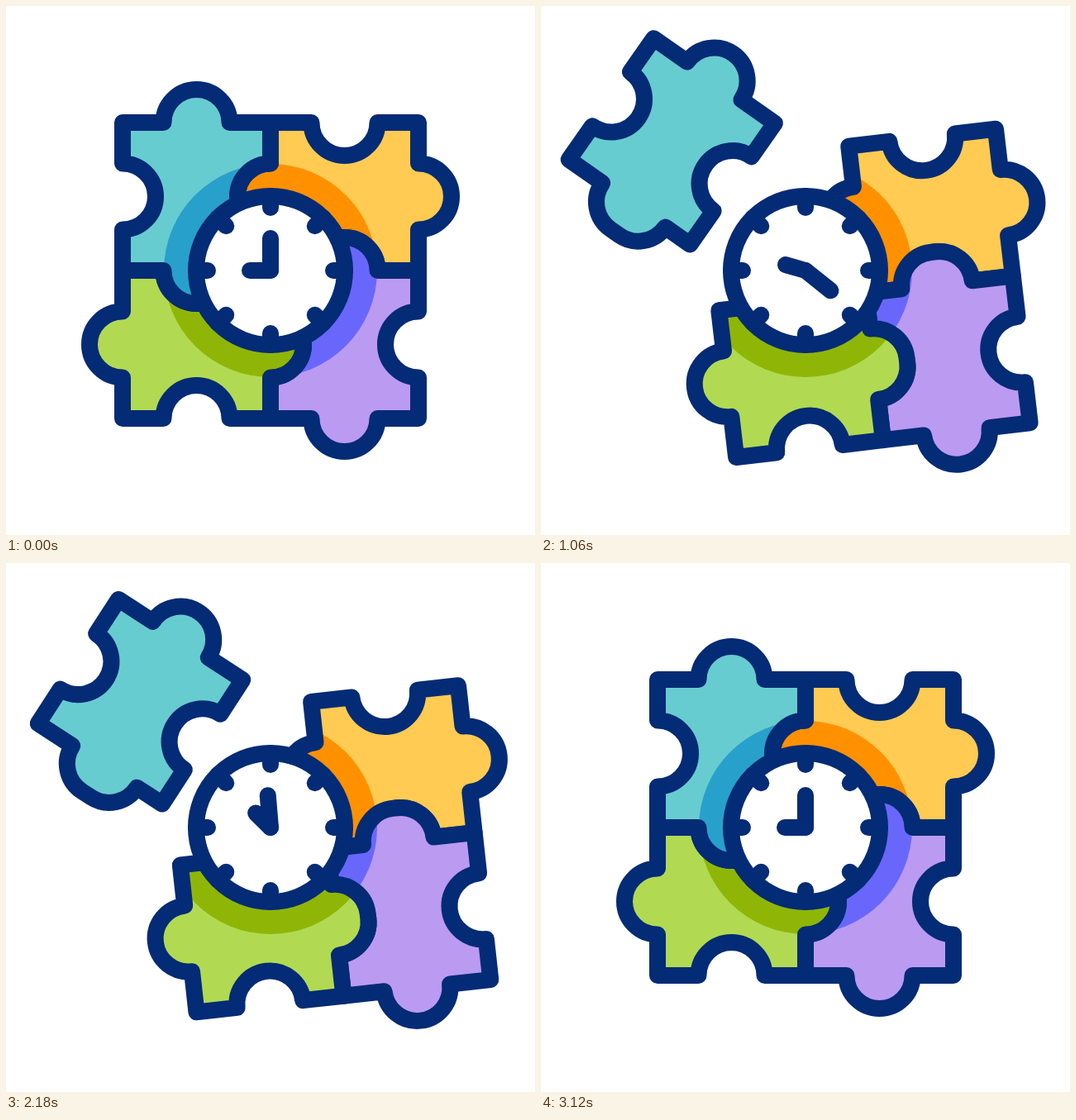
These frames come from a looping animation (640x640 px, 3.6 s). An HTML page with a canvas:

```html
<!DOCTYPE html>
<html lang="en">
<head>
<meta charset="utf-8">
<title>Puzzle clock</title>
<style>
html, body { margin: 0; width: 100%; height: 100%; overflow: hidden; background: #fff; }
canvas { display: block; width: 640px; height: 640px; }
</style>
</head>
<body>
<canvas id="stage" width="640" height="640"></canvas>
<script>
const ctx = document.getElementById('stage').getContext('2d');
const LOOP = 3600, C = 320, SIDE = 179, MID = SIDE / 2, R = 40;
const NAVY = '#042b75';
const rad = d => d * Math.PI / 180;
const clamp = x => Math.min(1, Math.max(0, x));
const sine = x => (1 - Math.cos(Math.PI * clamp(x))) / 2;

// Bezier easing with horizontal ends: (x1, 0, x2, 1)
function ease(x, x1, x2) {
  x = clamp(x);
  let lo = 0, hi = 1;
  for (let i = 0; i < 30; i++) {
    const u = (lo + hi) / 2, v = 1 - u;
    if (3 * v * v * u * x1 + 3 * v * u * u * x2 + u * u * u < x) lo = u; else hi = u;
  }
  return lo * lo * (3 - 2 * lo);
}

// Piece in the upper left quadrant; the others are quarter turns of it.
function piecePath(stretch) {
  const p = new Path2D(), q = Math.PI / 2;
  p.moveTo(-SIDE, -SIDE);
  p.arc(-MID, -SIDE, R, 2 * q, 4 * q);
  p.lineTo(0, -SIDE);
  p.arc(0, -MID, R, -q, q, true);
  p.lineTo(0, 0);
  p.arc(-MID + stretch, 0, R, 0, q);
  p.arc(-MID, 0, R, q, 2 * q);
  p.lineTo(-SIDE, 0);
  p.arc(-SIDE, -MID, R, q, -q, true);
  p.closePath();
  return p;
}

const pieces = [
  { turn: 1, fill: '#ffcb52', shade: '#ff9100', path: piecePath(6) },
  { turn: 2, fill: '#bb9af2', shade: '#6967fb', path: piecePath(6) },
  { turn: 3, fill: '#b1da52', shade: '#8fb607', path: piecePath(6) },
  { turn: 0, fill: '#67ccd0', shade: '#28a0cc', path: piecePath(13) }
];

function disc(r) {
  ctx.beginPath();
  ctx.arc(C, C, r, 0, 2 * Math.PI);
}

function place(piece, p) {
  if (piece.turn) {
    ctx.translate(C + 88.5 * p, C + 33.2 * p);
    ctx.rotate(rad(90 * piece.turn - 8.1 * p));
  } else {
    ctx.translate(C - MID - 87.5 * p, C - MID - 80.8 * p);
    ctx.rotate(rad(42.4 * p));
    ctx.translate(MID, MID);
  }
}

function drawPiece(piece, p) {
  ctx.save();
  place(piece, p);
  ctx.fillStyle = piece.fill;
  ctx.fill(piece.path);
  ctx.save();
  ctx.clip(piece.path);
  ctx.resetTransform();
  ctx.fillStyle = piece.shade;
  disc(129);
  ctx.fill();
  ctx.restore();
  ctx.stroke(piece.path);
  ctx.restore();
}

// Line along a clock direction, in degrees from twelve
function ray(deg, from, to) {
  const s = Math.sin(rad(deg)), c = -Math.cos(rad(deg));
  ctx.beginPath();
  ctx.moveTo(C + s * from, C + c * from);
  ctx.lineTo(C + s * to, C + c * to);
  ctx.stroke();
}

function drawClock(turn) {
  disc(90);
  ctx.fillStyle = '#fff';
  ctx.fill();
  ctx.stroke();
  for (let i = 0; i < 8; i++) ray(i * 45, 90, 76);
  ray(360 * turn, 0, 39);
  ray(270 + 45 * turn, 0, 25);
}

function draw(t) {
  const spread = t < 1580 ? ease((t - 160) / 1420, 0.32, 0.44)
                          : 1 - ease((t - 1580) / 1500, 0.58, 0.595);
  const turn = t < 2340 ? sine((t - 180) / 2160) : 1 - sine((t - 2340) / 740);
  ctx.fillStyle = '#fff';
  ctx.fillRect(0, 0, 640, 640);
  ctx.strokeStyle = NAVY;
  ctx.lineWidth = 20;
  ctx.lineCap = ctx.lineJoin = 'round';
  for (const piece of pieces) drawPiece(piece, spread);
  drawClock(turn);
}

const start = performance.now();
function tick() {
  draw((performance.now() - start) % LOOP);
  requestAnimationFrame(tick);
}
tick();
</script>
</body>
</html>
```
